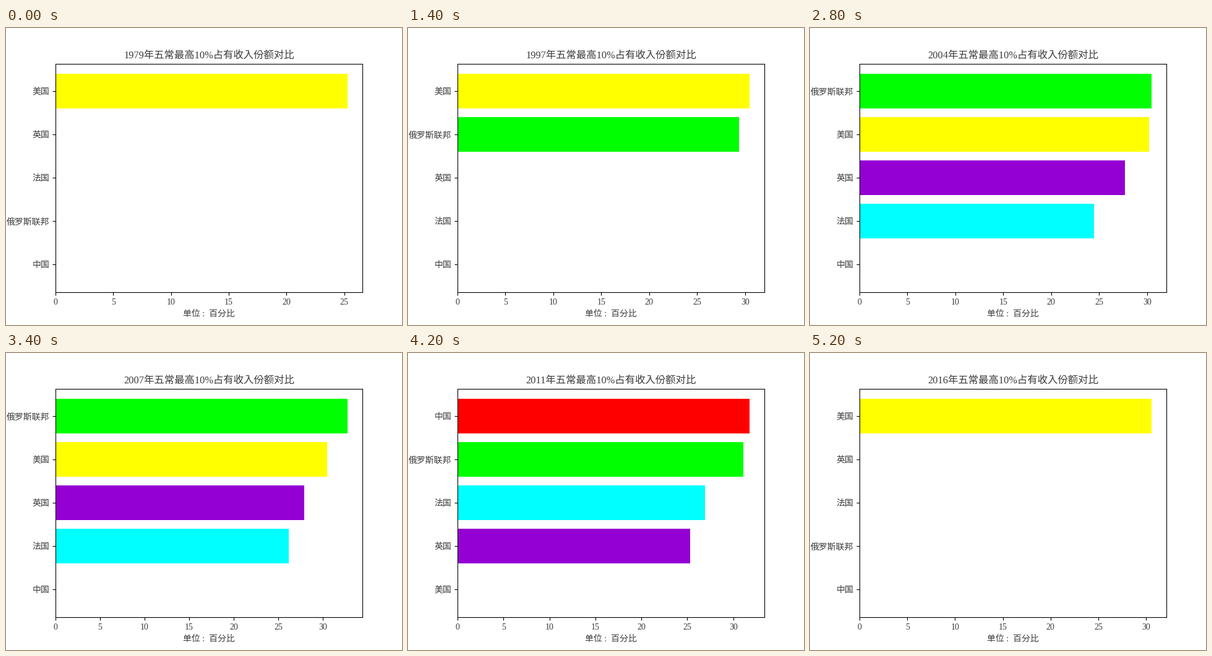
Animation of 640x480 px, one loop 5400 ms. Source, as a matplotlib script:

```python
import numpy as np
import matplotlib.pyplot as plt
from matplotlib.animation import FuncAnimation

INK = "#3a3a3a"
plt.rcParams.update({
    "font.family": ["Liberation Serif", "Noto Sans CJK JP"],
    "axes.titlesize": 11.8,
    "text.color": INK,
    "axes.labelcolor": INK,
    "xtick.labelcolor": INK,
    "ytick.labelcolor": INK,
})


def span(first, last, step=1):
    return set(range(first, last + 1, step))


# Name, bar colour, surveyed years, turning points of the share in percent.
COUNTRIES = [
    ("中国", "red", span(1990, 2008, 3) | span(2010, 2015),
     [(1990, 25.3), (1996, 26.9), (2002, 31.5), (2005, 30.6), (2010, 32.6),
      (2011, 31.8), (2015, 29.4)]),
    ("美国", "yellow", span(1979, 1986, 7) | span(1991, 2000, 3) | span(2004, 2016, 3),
     [(1979, 25.3), (1997, 30.5), (2004, 30.2), (2007, 30.5), (2016, 30.6)]),
    ("俄罗斯联邦", "lime", {1993} | span(1996, 2015),
     [(1993, 38.3), (1996, 36.6), (1997, 29.4), (2001, 27.9), (2003, 30.3),
      (2004, 30.5), (2007, 32.8), (2011, 31.1), (2013, 32.2), (2015, 29.7)]),
    ("法国", "cyan", span(2003, 2015),
     [(2003, 25.1), (2004, 24.5), (2007, 26.2), (2010, 27.6), (2011, 26.9),
      (2015, 26.5)]),
    ("英国", "darkviolet", span(2004, 2015),
     [(2004, 27.7), (2005, 26.6), (2007, 27.9), (2008, 26.5), (2011, 25.3),
      (2015, 25.4)]),
]
YEARS = sorted(set().union(*(surveys for _, _, surveys, _ in COUNTRIES)))


def share(year, surveys, points):
    """Income share between turning points, zero without a survey."""
    return np.interp(year, *zip(*points)) if year in surveys else 0


fig, ax = plt.subplots(figsize=(6.4, 4.8), dpi=100)


def draw(i):
    year = YEARS[i]
    rows = [(share(year, surveys, points), name, color)
            for name, color, surveys, points in COUNTRIES]
    rows.sort(key=lambda row: row[0])
    values, names, colors = zip(*rows)

    ax.clear()
    ax.barh(names, values, color=colors)
    ax.set_xlim(0, max(values) * 1.05)
    ax.set_title(f"{year}年五常最高10%占有收入份额对比")
    ax.set_xlabel("单位 :  百分比")


anim = FuncAnimation(fig, draw, frames=len(YEARS), init_func=lambda: None,
                     interval=200, repeat=True, repeat_delay=0)
plt.show()
```
